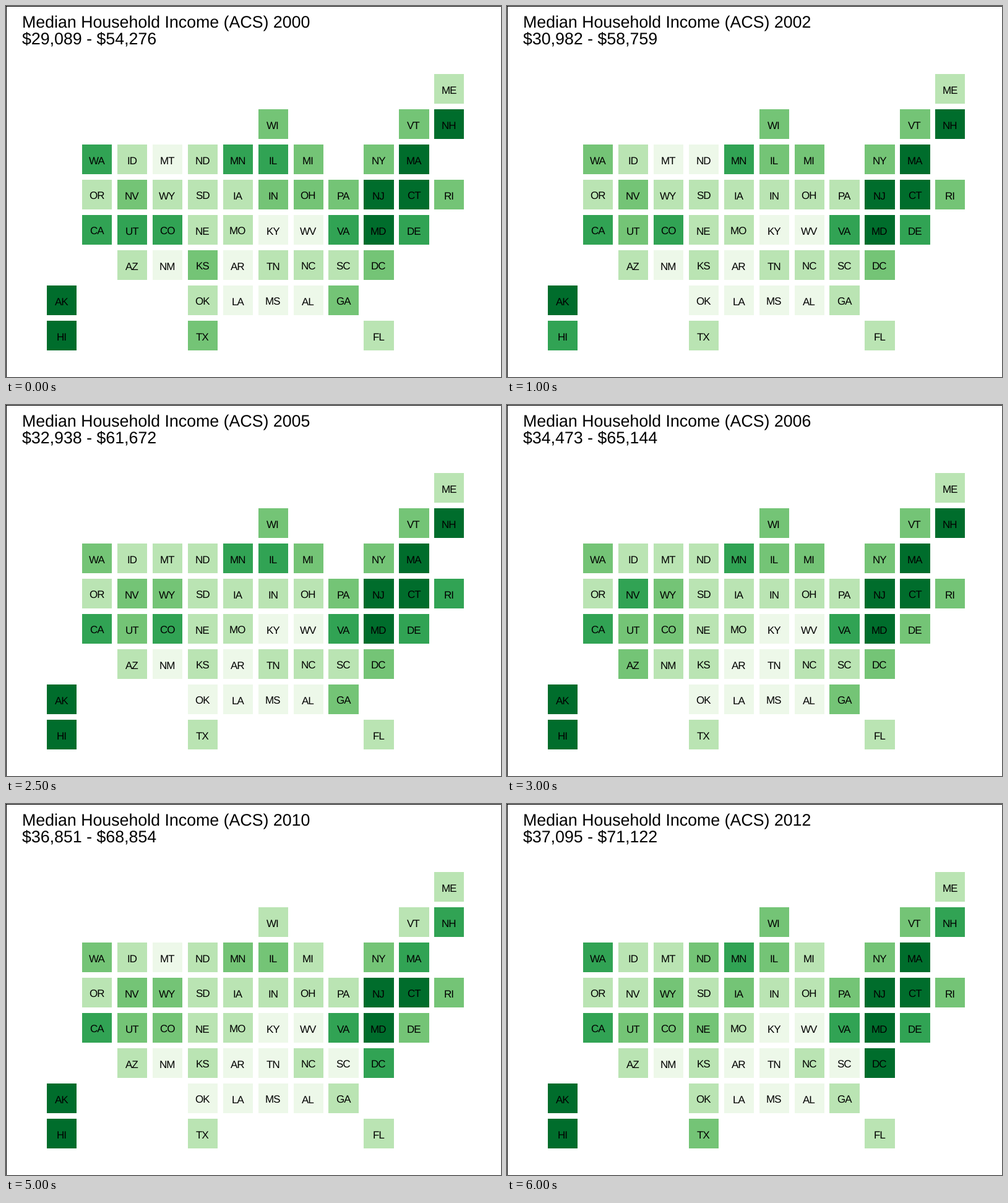
Recreate the animation shown at these times as a matplotlib script. Size 800 by 600 pixels, loop 6500 ms.

```python
import matplotlib.pyplot as plt
from matplotlib.animation import FuncAnimation
from matplotlib.patches import Rectangle

plt.rcParams["font.family"] = "Liberation Sans"
plt.rcParams["text.hinting"] = "none"

W, H, DPI = 800, 600, 100
GREENS = ["#edf8e9", "#bae4b3", "#74c476", "#31a354", "#006d2c"]
LEFT, TOP, PITCH, SIDE = 66, 110.1, 56.93, 48.2

# One row per line: first column, then states with their level in 2000.
GRID = [
    "11 ME1",
    "6 WI2 | 10 VT2 NH4",
    "1 WA3 ID1 MT0 ND1 MN3 IL3 MI2 | 9 NY2 MA4",
    "1 OR1 NV2 WY1 SD1 IA1 IN2 OH2 PA2 NJ4 CT4 RI2",
    "1 CA3 UT3 CO3 NE1 MO1 KY0 WV0 VA3 MD4 DE3",
    "2 AZ1 NM0 KS2 AR0 TN1 NC1 SC1 DC2",
    "0 AK4 | 4 OK1 LA0 MS0 AL0 GA2",
    "0 HI4 | 4 TX2 | 9 FL1",
]

# Range of incomes, and the states that enter a new level that year.
YEARS = [
    (29089, 54276, ""),
    (29673, 56771, "HI3 WA2 UT2 OH1 PA1 KS1"),
    (30982, 58759, "IL2 IN1 ND0 OK0 GA1 TX1"),
    (31008, 58588, "AK3 GA2 IL3 ND1 WY2"),
    (31504, 61359, "AK4 IL2 GA1 CO2"),
    (32938, 61672, "GA2 IL3 HI4 MT1 CO3 PA2 RI3"),
    (34473, 65144, "IL2 PA1 RI2 CO2 NV3 DE2 AZ2 NM1 TN0"),
    (36338, 68080, "MI1 NV2 WA3 NM0"),
    (37790, 70545, "NH3 MT0 MN2 DE3 DC3 GA1"),
    (36646, 69272, "AZ1 SC0"),
    (36851, 68854, "WA2 WI1 VT1 MA3 DE2"),
    (36919, 70004, "WA3 HI3 ID0 MT1 ND2 MN3 WI2 VT2 NV1 PA2 NE2 DE3"),
    (37095, 71122, "HI4 ID1 MA4 DC4 IA2 OK1 TX2"),
]


def read_levels(text):
    return {item[:2]: int(item[2]) for item in text.split()}


def points(px):
    return px * 72 / DPI


fig = plt.figure(figsize=(W / DPI, H / DPI), dpi=DPI, facecolor="white")
ax = fig.add_axes([0, 0, 1, 1])
ax.set_xlim(0, W)
ax.set_ylim(H, 0)
ax.axis("off")


def add_box(x, y, w, h, color):
    return ax.add_patch(Rectangle((x, y), w, h, facecolor=color, linewidth=0))


add_box(0, 0, W, 1, "black")
add_box(0, 0, 1, H, "black")

tiles, start = {}, {}
for row, line in enumerate(GRID):
    for run in line.split("|"):
        first, items = run.strip().split(" ", 1)
        levels = read_levels(items)
        start.update(levels)
        for col, state in enumerate(levels, int(first)):
            x, y = LEFT + PITCH * col, TOP + PITCH * row
            tiles[state] = add_box(x, y, SIDE, SIDE, "white")
            ax.text(x + 23.9, y + 31.9, state, size=points(17.07),
                    ha="center", va="baseline")

title = ax.text(25.6, 35, "", size=points(26.8), va="baseline")
limits = ax.text(25.6, 63, "", size=points(26.8), va="baseline")


def draw(i):
    levels = dict(start)
    for _, _, changes in YEARS[:i + 1]:
        levels.update(read_levels(changes))
    for state, tile in tiles.items():
        tile.set_facecolor(GREENS[levels[state]])
    low, high, _ = YEARS[i]
    title.set_text(f"Median Household Income (ACS) {2000 + i}")
    limits.set_text(rf"\${low:,} - \${high:,}")
    return [title, limits, *tiles.values()]


anim = FuncAnimation(fig, draw, frames=len(YEARS), interval=500,
                     repeat=True, repeat_delay=0)
plt.show()
```
